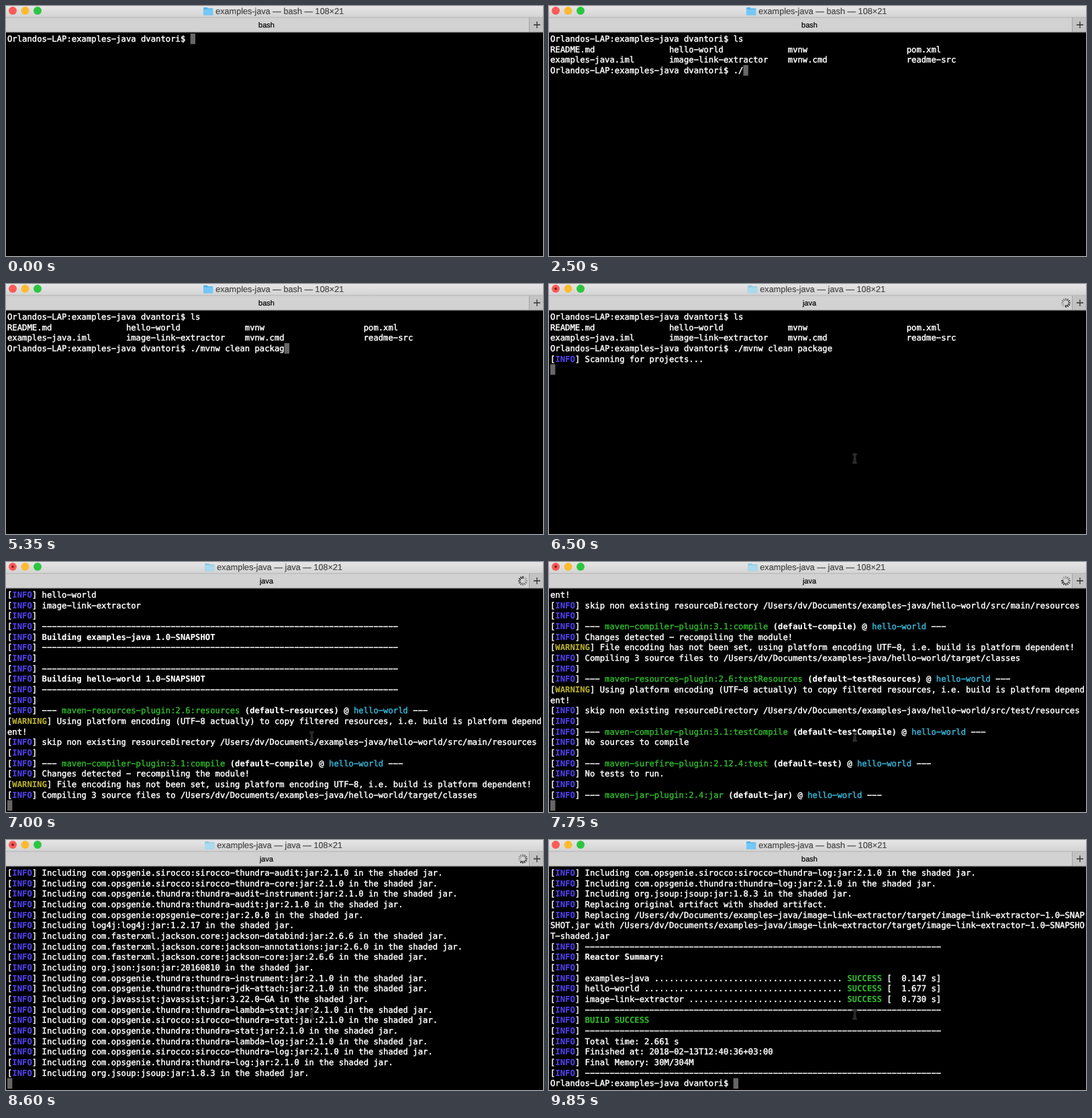
Recreate the animation shown at these times as an HTML page with a canvas. Size 800 px wide and 372 px high, loop 9900 ms.

```html
<!DOCTYPE html>
<html lang="en">
<head>
<meta charset="utf-8">
<title>Terminal</title>
<style>
  html, body { margin: 0; height: 100%; overflow: hidden; background: #000; }
  canvas { display: block; }
</style>
</head>
<body>
<canvas width="800" height="372"></canvas>
<script>
const ctx = document.querySelector('canvas').getContext('2d');
const LOOP = 9900, COLS = 108, ROWS = 21;
const CELL_W = 7.37, CELL_H = 15.67, LEFT = 2, TOP = 41;
const RUN_START = 5750, RUN_END = 9250, POINTER_START = 5900;

// Inline <x> codes switch to one of these [color, weight] styles.
const STYLES = {
  w: ['#fff', ''], s: ['#fff', 'bold'], b: ['#5040ea', 'bold'], y: ['#b5ad2f', 'bold'],
  g: ['#2fb52d', ''], G: ['#2fb52d', 'bold'], c: ['#37b6d8', '']
};

const PROMPT = 'Orlandos-LAP:examples-java dvantori$ ';
const HOME = '/Users/dv/Documents/examples-java/';
const RULE = '<s>' + '-'.repeat(72);

const events = [];
const print = (time, text) => events.push({ time, text });
const info = (time, ...lines) => lines.forEach(s => print(time, `[<b>INFO<w>] ${s}<w>\n`));
const warn = (time, s) => print(time, `[<y>WARNING<w>] ${s}\n`);
const type = (text, times) => times.forEach((time, i) => print(time, text[i]));

const goal = (time, plugin, id, module) =>
  info(time, '', `<s>--- <g>${plugin}<w> <s>(${id})<w> @ <c>${module}<s> ---`);
const building = (time, name) =>
  info(time, '', RULE, `<s>Building ${name} 1.0-SNAPSHOT`, RULE);

const deps = [
  'com.amazonaws:aws-lambda-java-core:1.1.0',
  'com.opsgenie.thundra:thundra-lambda:2.1.0',
  'com.opsgenie.thundra:thundra-core:2.1.0',
  'com.opsgenie.sirocco:sirocco-thundra-audit:2.1.0',
  'com.opsgenie.sirocco:sirocco-thundra-core:2.1.0',
  'com.opsgenie.thundra:thundra-audit-instrument:2.1.0',
  'com.opsgenie.thundra:thundra-audit:2.1.0',
  'com.opsgenie:opsgenie-core:2.0.0',
  'log4j:log4j:1.2.17',
  'com.fasterxml.jackson.core:jackson-databind:2.6.6',
  'com.fasterxml.jackson.core:jackson-annotations:2.6.0',
  'com.fasterxml.jackson.core:jackson-core:2.6.6',
  'org.json:json:20160810',
  'com.opsgenie.thundra:thundra-instrument:2.1.0',
  'com.opsgenie.thundra:thundra-jdk-attach:2.1.0',
  'org.javassist:javassist:3.22.0-GA',
  'com.opsgenie.thundra:thundra-lambda-stat:2.1.0',
  'com.opsgenie.sirocco:sirocco-thundra-stat:2.1.0',
  'com.opsgenie.thundra:thundra-stat:2.1.0',
  'com.opsgenie.thundra:thundra-lambda-log:2.1.0',
  'com.opsgenie.sirocco:sirocco-thundra-log:2.1.0',
  'com.opsgenie.thundra:thundra-log:2.1.0'
];

function resources(time, name, step, id, folder) {
  goal(time, `maven-resources-plugin:2.6:${step}`, id, name);
  warn(time, 'Using platform encoding (UTF-8 actually) to copy filtered resources, i.e. build is platform dependent!');
  info(time, `skip non existing resourceDirectory ${HOME}${name}/src/${folder}/resources`);
}

function buildModule(name, sources, libs, at) {
  const jar = `${HOME}${name}/target/${name}-1.0-SNAPSHOT`;
  building(at.start, name);
  resources(at.resources, name, 'resources', 'default-resources', 'main');
  goal(at.compile, 'maven-compiler-plugin:3.1:compile', 'default-compile', name);
  info(at.compile, 'Changes detected - recompiling the module!');
  warn(at.compile, 'File encoding has not been set, using platform encoding UTF-8, i.e. build is platform dependent!');
  info(at.compile, `Compiling ${sources} to ${HOME}${name}/target/classes`);
  resources(at.test, name, 'testResources', 'default-testResources', 'test');
  goal(at.test, 'maven-compiler-plugin:3.1:testCompile', 'default-testCompile', name);
  info(at.test, 'No sources to compile');
  goal(at.test, 'maven-surefire-plugin:2.12.4:test', 'default-test', name);
  info(at.test, 'No tests to run.');
  goal(at.jar, 'maven-jar-plugin:2.4:jar', 'default-jar', name);
  info(at.shade, `Building jar: ${jar}.jar`);
  goal(at.shade, 'maven-shade-plugin:3.0.0:shade', 'default', name);
  for (const lib of libs) {
    info(at.shade, `Including ${lib.replace(/:(?=[^:]*$)/, ':jar:')} in the shaded jar.`);
  }
  info(at.end, 'Replacing original artifact with shaded artifact.',
    `Replacing ${jar}.jar with ${jar}-shaded.jar`);
}

const summary = (name, time) => `${(name + ' ').padEnd(52, '.')} <G>SUCCESS<w> [  ${time} s]`;
const listing = (...names) => names.map(s => s.padEnd(24)).join('').trimEnd() + '\n';

print(0, PROMPT);
type('ls\n', [350, 500, 750]);
print(750, listing('README.md', 'hello-world', 'mvnw', 'pom.xml')
  + listing('examples-java.iml', 'image-link-extractor', 'mvnw.cmd', 'readme-src') + PROMPT);
type('./mvnw clean package\n', [2200, 2400, 2650, 2850, 3000, 3200, 3450, 3600, 3750, 3900,
  4080, 4250, 4400, 4550, 4700, 4850, 5000, 5150, 5280, 5420, RUN_START]);

info(6350, 'Scanning for projects...');
info(6580, RULE, '<s>Reactor Build Order:', '', 'examples-java', 'hello-world', 'image-link-extractor');
building(6600, 'examples-java');
buildModule('hello-world', '3 source files', deps,
  { start: 6700, resources: 6850, compile: 7000, test: 7600, jar: 7700, shade: 7900, end: 8250 });
buildModule('image-link-extractor', '2 source files', [...deps, 'org.jsoup:jsoup:1.8.3'],
  { start: 8270, resources: 8290, compile: 8310, test: 8450, jar: 8480, shade: 8550, end: 9050 });
info(9150, RULE, '<s>Reactor Summary:', '', summary('examples-java', '0.147'),
  summary('hello-world', '1.677'), summary('image-link-extractor', '0.730'),
  RULE, '<G>BUILD SUCCESS', RULE, 'Total time: 2.661 s',
  'Finished at: 2018-02-13T12:40:36+03:00', 'Final Memory: 30M/304M', RULE);
print(RUN_END, PROMPT);

// Lays the text printed so far out on the terminal grid.
function layout(time) {
  const text = events.filter(e => e.time <= time).map(e => e.text).join('');
  const rows = [[]];
  let style = 'w';
  for (const token of text.match(/<\w>|[^]/g)) {
    if (token.length > 1) style = token[1];
    else if (token === '\n') rows.push([]);
    else {
      if (rows.at(-1).length === COLS) rows.push([]);
      rows.at(-1).push([token, style]);
    }
  }
  return rows.slice(-ROWS);
}

function box(color, x, y, w, h) {
  ctx.fillStyle = color;
  ctx.fillRect(x, y, w, h);
}

function disc(color, x, y, r) {
  ctx.fillStyle = color;
  ctx.beginPath();
  ctx.arc(x, y, r, 0, 2 * Math.PI);
  ctx.fill();
}

function line(color, width, ...points) {
  ctx.strokeStyle = color;
  ctx.lineWidth = width;
  ctx.beginPath();
  for (let i = 0; i < points.length; i += 4) {
    ctx.moveTo(points[i], points[i + 1]);
    ctx.lineTo(points[i + 2], points[i + 3]);
  }
  ctx.stroke();
}

// Fills text with a thin outline, as smoothed desktop text looks heavier.
function inkText(text, color, outline, x, y) {
  ctx.fillStyle = ctx.strokeStyle = color;
  ctx.lineWidth = outline;
  ctx.fillText(text, x, y);
  ctx.strokeText(text, x, y);
}

function label(text, color, size, x, y) {
  ctx.font = `${size}px "Liberation Sans", Arial, sans-serif`;
  inkText(text, color, 0.2, x, y);
  return ctx.measureText(text).width;
}

function drawSpinner(time) {
  const head = Math.floor(time / 1000 * 12);
  for (let i = 0; i < 12; i++) {
    const a = i * Math.PI / 6, age = ((head - i) % 12 + 12) % 12;
    const dx = Math.sin(a), dy = -Math.cos(a);
    line(`rgba(0,0,0,${0.95 - age * 0.07})`, 1.5,
      770 + 3.6 * dx, 28 + 3.6 * dy, 770 + 7 * dx, 28 + 7 * dy);
  }
}

function drawHeader(time) {
  const running = time >= RUN_START && time < RUN_END;
  const process = running ? 'java' : 'bash';
  const shade = ctx.createLinearGradient(0, 0, 0, 17);
  shade.addColorStop(0, '#e6e6e6');
  shade.addColorStop(1, '#d3d3d3');
  box(shade, 0, 0, 800, 17);
  box('#d2d2d2', 0, 17, 779, 22);
  box('#c3c3c3', 780, 17, 20, 22);
  box('#b4b4b4', 0, 16.5, 800, 1);
  box('#a2a2a2', 779, 17, 1, 22);
  box('#8c8c8c', 0, 38.5, 800, 1);
  line('#333', 1.3, 786, 28, 796, 28, 791, 23, 791, 33);

  disc('#fc5b57', 10, 7, 6);
  disc('#fdbb2f', 28.5, 7, 6);
  disc('#2bc640', 47, 7, 6);
  if (running) disc('#6b1512', 10, 7, 1.8);

  ctx.textAlign = 'center';
  const width = label(`examples-java — ${process} — 108×21`, '#444', 12.66, 407.7, 12);
  label(process, '#000', 11, 388, 32);
  const x = 407.7 - width / 2 - 18;
  box(running ? '#92cbe4' : '#56b5ec', x, 2, 6, 3);
  box(running ? '#92cbe4' : '#56b5ec', x, 3.5, 14, 10);
  box(running ? '#a9daee' : '#72c8f8', x, 5, 14, 8.5);
  if (running) drawSpinner(time);
}

function drawScreen(time) {
  const rows = layout(time);
  const last = rows.length - 1;
  box('#666', LEFT + rows[last].length * CELL_W, TOP + last * CELL_H, CELL_W, CELL_H);
  ctx.textAlign = 'left';
  let current;
  rows.forEach((row, r) => row.forEach(([char, style], c) => {
    if (char === ' ') return;
    const [color, weight] = STYLES[style];
    if (style !== current) {
      ctx.font = `${weight} 12.24px "DejaVu Sans Mono", monospace`;
      current = style;
    }
    // The terminal's hyphen is as wide as a minus sign.
    const glyph = char === '-' ? '\u2212' : char;
    inkText(glyph, color, weight ? 0.15 : 0.45, LEFT + c * CELL_W, TOP + 12 + r * CELL_H);
  }));
}

function drawPointer() {
  const beam = [455.5, 254, 455.5, 266, 452.5, 253.5, 458.5, 253.5,
    452.5, 266, 458.5, 266, 453.5, 262, 457.5, 262];
  line('#505050', 2.4, ...beam);
  line('#111', 0.9, ...beam);
}

function frame() {
  const time = performance.now() % LOOP;
  ctx.textRendering = 'geometricPrecision';
  ctx.lineJoin = 'round';
  box('#000', 0, 0, 800, 372);
  drawScreen(time);
  drawHeader(time);
  if (time >= POINTER_START) drawPointer();
  requestAnimationFrame(frame);
}
frame();
</script>
</body>
</html>
```
